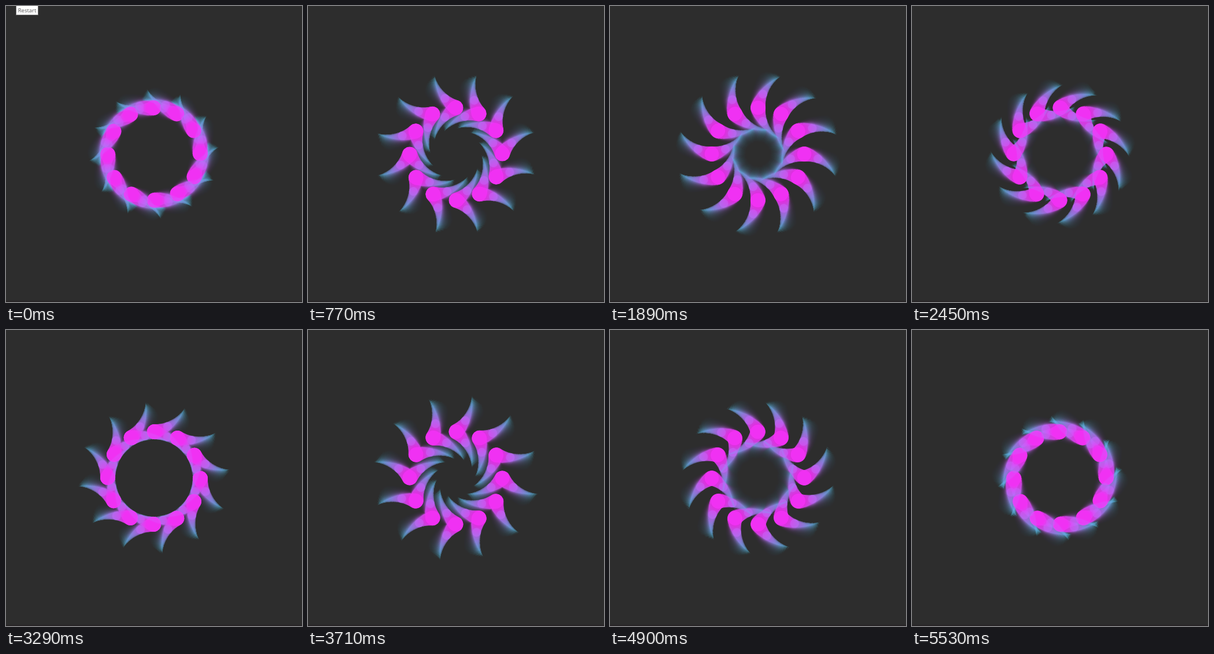
Animation of 512 by 512 pixels, one loop 5.6 s. Source, as an HTML page with a canvas:

```html
<!DOCTYPE html>
<html lang="en">
<head>
<meta charset="utf-8">
<title>Spinning blades</title>
<style>
  html, body { margin: 0; width: 100%; height: 100%; overflow: hidden; background: #2e2e2e; }
  canvas { display: block; }
  #tip {
    position: absolute; left: 17px; top: -1px; width: 39px; height: 17px;
    box-sizing: border-box; border: 1px solid #767676; background: #fff; color: #575757;
    font: 9.5px/15px "Open Sans", sans-serif; text-align: center;
  }
</style>
</head>
<body>
<canvas id="stage" width="512" height="512"></canvas>
<div id="tip">Restart</div>
<script>
const LOOP = 5600, STEP = 70;
const UNITS = 12, RING = 80, REACH = 69, KNOB = 13;
const BEND = 25 * Math.PI / 180;
const TRAIL = 28, TRAIL_STEP = 1.1, FADE = 0.12, INK = 0.42;
const BASE = [255, 48, 255], END = [66, 214, 236];

// blade angle in degrees over time
const TURN = [[0, -80], [1400, 5.2], [2450, 72], [3290, 128], [4130, 185], [4900, 234.5], [5600, 280]];

const ctx = document.getElementById('stage').getContext('2d');
const tip = document.getElementById('tip');

function angleAt(t) {
  const i = TURN.findIndex(p => p[0] > t);
  const [t0, a0] = TURN[i - 1], [t1, a1] = TURN[i];
  return a0 + (a1 - a0) * (t - t0) / (t1 - t0);
}

// Part of a tapering, bent blade, drawn from its outer end inwards.
function makeBlade(from, to) {
  const c = document.createElement('canvas');
  c.width = 200;
  c.height = 100;
  const g = c.getContext('2d');
  g.scale(2, 2);
  g.translate(16, 30);
  for (let s = from; s >= to; s -= 0.01) {
    const a = -BEND * (1 - s), r = REACH * s;
    const rgb = BASE.map((v, i) => Math.round(v + (END[i] - v) * s));
    g.fillStyle = `rgb(${rgb})`;
    g.beginPath();
    g.arc(r * Math.cos(a), r * Math.sin(a), KNOB * (1 - s) ** 1.3, 0, 2 * Math.PI);
    g.fill();
  }
  return c;
}

const layers = [makeBlade(0.99, 0.35), makeBlade(0.37, 0)];

function drawBlades(deg) {
  const phi = deg * Math.PI / 180;
  ctx.globalAlpha = INK;
  for (const blade of layers) {
    for (let i = 0; i < UNITS; i++) {
      for (const side of [1, -1]) {
        ctx.save();
        ctx.translate(256, 256);
        ctx.rotate(i * 2 * Math.PI / UNITS);
        ctx.translate(RING, 0);
        ctx.scale(side, 1);
        ctx.rotate(phi);
        ctx.drawImage(blade, -16, -30, 100, 50);
        ctx.restore();
      }
    }
  }
}

function veil(alpha) {
  ctx.globalAlpha = alpha;
  ctx.fillStyle = '#2e2e2e';
  ctx.fillRect(0, 0, 512, 512);
}

function draw(t) {
  const deg = angleAt(t);
  veil(1);
  for (let k = TRAIL; k >= 0; k--) {
    veil(FADE);
    drawBlades(deg - k * TRAIL_STEP);
  }
  ctx.globalAlpha = 1;
  ctx.fillStyle = '#272426';
  ctx.fillRect(0, 510, 512, 2);
  tip.style.display = t < STEP ? 'block' : 'none';
}

const start = performance.now();
let shown = -1;

function tick() {
  const t = (performance.now() - start) % LOOP;
  const step = Math.floor(t / STEP);
  if (step !== shown) {
    shown = step;
    draw(step * STEP);
  }
  requestAnimationFrame(tick);
}
tick();
</script>
</body>
</html>
```
